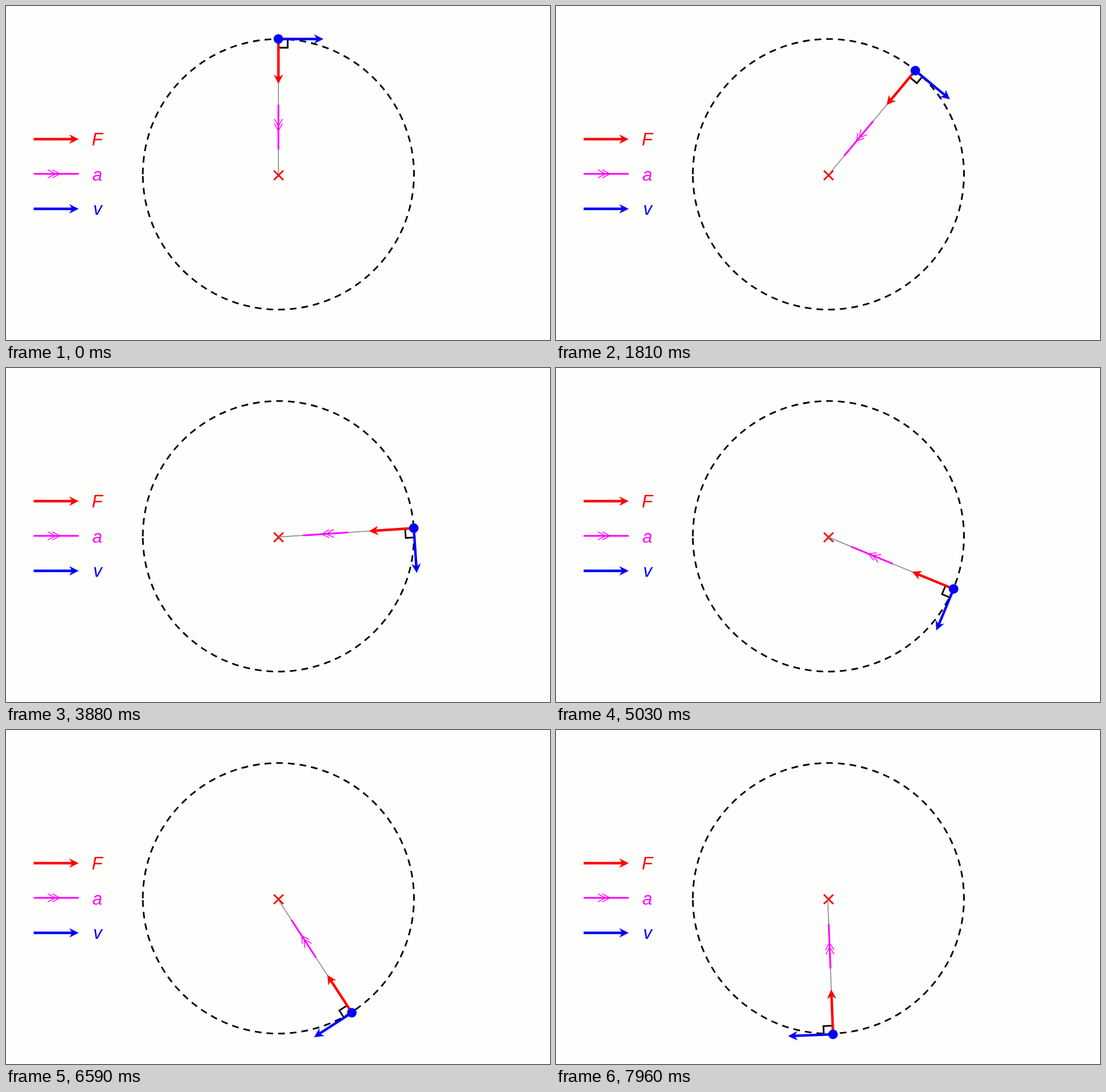
An HTML page with a canvas for the animation above (8000 ms loop, 954 by 587 pixels).

```html
<!DOCTYPE html>
<html lang="en">
<head>
<meta charset="utf-8">
<title>Uniform circular motion</title>
<style>
  html, body { margin: 0; width: 100%; height: 100%; overflow: hidden; background: #fefefd; }
  canvas { display: block; width: 954px; height: 587px; }
</style>
</head>
<body>
<canvas id="stage"></canvas>
<script>
const W = 954, H = 587, LOOP = 8000;
const RED = '#ff0000', BLUE = '#0000ff', PINK = '#ff00ff';
const PIVOT = { x: 477.1, y: 296.5 };
const REACH = 238.5, OFFSET = 0.6, ARROW = 79;

// One turn takes 16 s, shown in 30 steps a second after a short delay
const DELAY = 29, RATE = 30 / 1000, STEP = 2 * Math.PI / (16 * 30);

const canvas = document.getElementById('stage');
const ctx = canvas.getContext('2d');
const scale = window.devicePixelRatio || 1;
canvas.width = W * scale;
canvas.height = H * scale;

function angleAt(t) {
  return Math.floor(Math.max(0, t - DELAY) * RATE) * STEP;
}

function line(points, color, width) {
  ctx.beginPath();
  points.forEach(([x, y]) => ctx.lineTo(x, y));
  ctx.strokeStyle = color;
  ctx.lineWidth = width;
  ctx.stroke();
}

// Runs draw with the origin at (x, y) and the x axis turned by angle
function at(x, y, angle, draw) {
  ctx.save();
  ctx.translate(x, y);
  ctx.rotate(angle);
  draw();
  ctx.restore();
}

function arrow(color) {
  line([[0, 0], [ARROW - 10, 0]], color, 4.4);
  ctx.beginPath();
  ctx.moveTo(ARROW, 0);
  ctx.lineTo(ARROW - 16.5, -8.2);
  ctx.lineTo(ARROW - 11.5, 0);
  ctx.lineTo(ARROW - 16.5, 8.2);
  ctx.fillStyle = color;
  ctx.fill();
}

function doubleArrow() {
  line([[0, 0], [ARROW, 0]], PINK, 3);
  for (const tip of [38, 46]) {
    line([[tip - 13, -7.2], [tip, 0], [tip - 13, 7.2]], PINK, 1.5);
  }
}

function label(text, x, y, color) {
  ctx.font = 'italic 31px "Liberation Sans", Arial, sans-serif';
  ctx.fillStyle = color;
  ctx.fillText(text, x, y);
}

function drawLegend() {
  at(48.5, 234, 0, () => arrow(RED));
  at(48.5, 295, 0, doubleArrow);
  at(48.5, 356.5, 0, () => arrow(BLUE));
  label('F', 150.5, 245, RED);
  label('a', 151.5, 306.5, PINK);
  label('v', 153, 367, BLUE);
}

function drawOrbit() {
  ctx.beginPath();
  ctx.arc(477.7, 295.75, 237.75, Math.PI, 3 * Math.PI);
  ctx.setLineDash([11.73, 8.8]);
  ctx.strokeStyle = '#000';
  ctx.lineWidth = 2.9;
  ctx.stroke();
  ctx.setLineDash([]);
}

function drawCross() {
  const x = 478, y = 297.5, r = 8.3;
  line([[x - r, y - r], [x + r, y + r]], RED, 3);
  line([[x - r, y + r], [x + r, y - r]], RED, 3);
}

// Local axes: x along the velocity, y towards the centre
function drawBody(angle) {
  at(PIVOT.x, PIVOT.y, angle, () => {
    ctx.translate(OFFSET, 0);
    line([[0, 0], [0, -REACH]], '#808080', 1.5);
    at(0, -123, Math.PI / 2, doubleArrow);
    at(0, -REACH, 0, () => {
      line([[0, 15.2], [16.3, 15.2], [16.3, 0]], '#000', 2.9);
      at(0, 0, Math.PI / 2, () => arrow(RED));
      arrow(BLUE);
      ctx.beginPath();
      ctx.arc(0, 0, 8.4, 0, 2 * Math.PI);
      ctx.fillStyle = BLUE;
      ctx.fill();
    });
  });
}

function frame() {
  const t = performance.now() % LOOP;
  ctx.setTransform(scale, 0, 0, scale, 0, 0);
  ctx.fillStyle = '#fefefd';
  ctx.fillRect(0, 0, W, H);
  drawLegend();
  drawOrbit();
  drawCross();
  drawBody(angleAt(t));
  requestAnimationFrame(frame);
}
frame();
</script>
</body>
</html>
```
